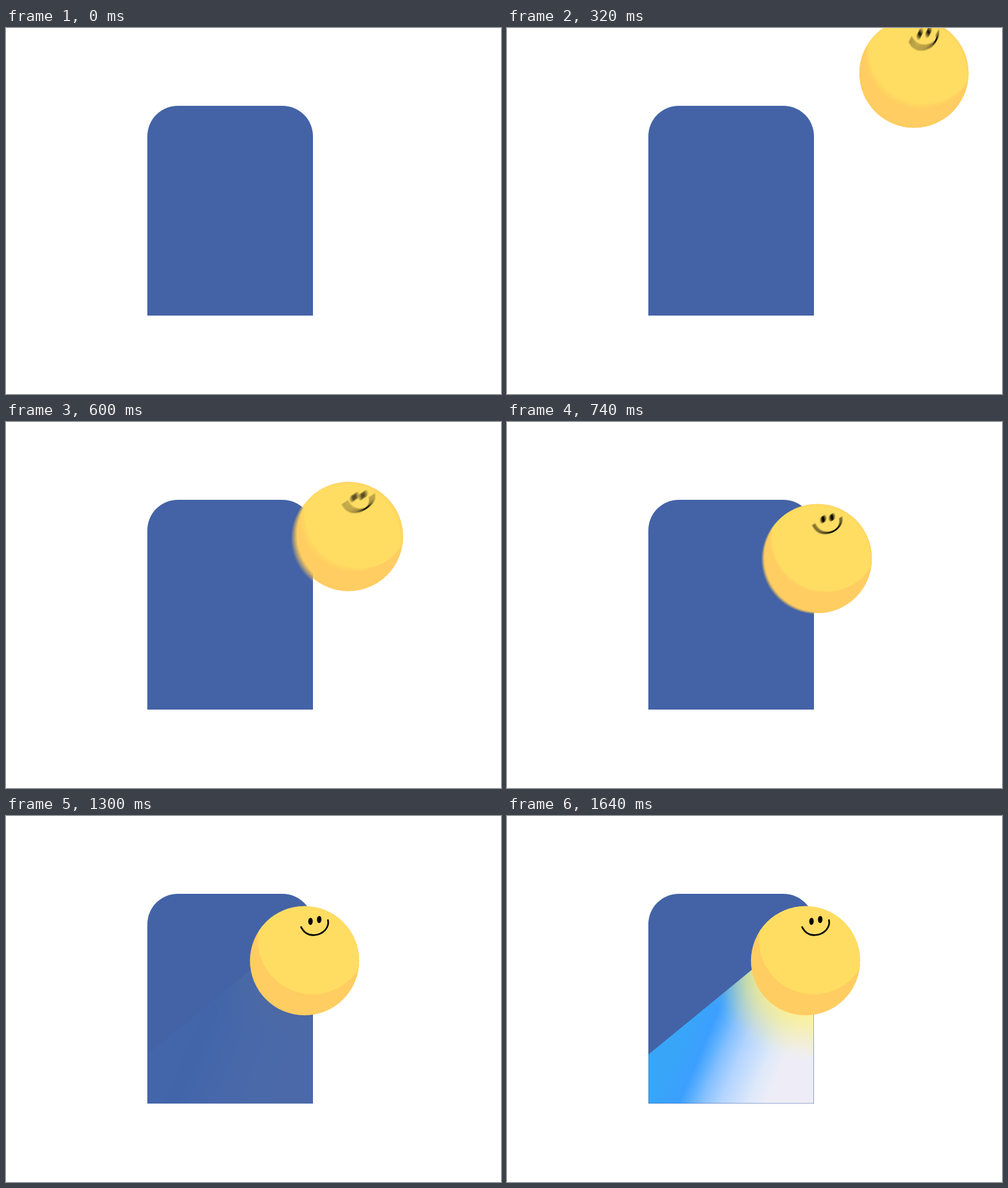
These frames come from a looping animation (795 px wide and 588 px high, 2.74 s). An HTML page with a canvas:

```html
<!DOCTYPE html>
<html lang="en">
<head>
<meta charset="utf-8">
<title>Sunrise</title>
<style>
html, body { margin: 0; width: 100%; height: 100%; overflow: hidden; background: #fff; }
canvas { display: block; }
</style>
</head>
<body>
<canvas id="stage" width="795" height="588"></canvas>
<script>
const W = 795, H = 588, LOOP = 2740, STEP = 20, SHUTTER = 20, SAMPLES = 10, R = 87.7;
const stage = document.getElementById('stage').getContext('2d');

function layer() {
  const canvas = document.createElement('canvas');
  canvas.width = W;
  canvas.height = H;
  return canvas.getContext('2d');
}

const disc = (x, y, r = R) => {
  const path = new Path2D();
  path.arc(x, y, r, 0, 2 * Math.PI);
  return path;
};

const panel = new Path2D();
panel.roundRect(227, 125, 266, 337, [49, 49, 0, 0]);

// Sun path: time, position and velocity in px/ms
const keys = [
  { t: 0, x: 685.5, y: -107, vx: 0, vy: 0.62 },
  { t: 40, x: 685.5, y: -82, vx: 0, vy: 0.62 },
  { t: 200, x: 676.5, y: 11, vx: -0.13, vy: 0.53 },
  { t: 440, x: 617.5, y: 126.5, vx: -0.35, vy: 0.4 },
  { t: 560, x: 571, y: 169.5, vx: -0.46, vy: 0.35 },
  { t: 600, x: 550, y: 184, vx: -0.5, vy: 0.34 },
  { t: 900, x: 479.5, y: 232.5, vx: 0, vy: 0 }
];

function hermite(a, b, u, axis) {
  const span = b.t - a.t, v = 'v' + axis, u2 = u * u, u3 = u2 * u;
  return a[axis] * (2 * u3 - 3 * u2 + 1) + b[axis] * (3 * u2 - 2 * u3)
    + span * (a[v] * (u3 - 2 * u2 + u) + b[v] * (u3 - u2));
}

function sunAt(time) {
  const t = Math.min(Math.max(time, 0), 900);
  const i = Math.max(1, keys.findIndex(k => k.t >= t));
  const a = keys[i - 1], b = keys[i], u = (t - a.t) / (b.t - a.t);
  return { x: hermite(a, b, u, 'x'), y: hermite(a, b, u, 'y') };
}

function drawSun(c, { x, y }) {
  c.save();
  c.translate(x, y);
  c.fillStyle = '#ffcd61';
  c.fill(disc(0, 0));
  c.save();
  c.clip(disc(0, 0));
  c.fillStyle = '#ffdd62';
  c.fill(disc(12.7, -33.7));
  c.restore();

  c.fillStyle = c.strokeStyle = '#000';
  for (const [ex, ey] of [[9.5, -63.2], [23.5, -66.2]]) {
    c.beginPath();
    c.ellipse(ex, ey, 3.6, 5.8, 0.05, 0, 2 * Math.PI);
    c.fill();
  }
  c.lineWidth = 2.6;
  c.lineCap = 'round';
  c.beginPath();
  c.moveTo(-5.6, -54.2);
  c.bezierCurveTo(-1, -45, 7, -40.5, 16, -41.2);
  c.bezierCurveTo(30, -42.5, 40, -53, 37.6, -65.2);
  c.stroke();
  c.restore();
}

function makeBeam() {
  const c = layer();
  const edge = new Path2D('M227.3 383 L480 176 L492.4 232 V461.4 H227.3 Z');
  const sky = c.createLinearGradient(365, 159, 519, 225);
  [[0, '#38a5f8'], [0.22, '#3c9fff'], [0.32, '#5cb0ff'], [0.42, '#85c0ff'],
   [0.58, '#b2d4ff'], [0.84, '#dee9f9'], [1, '#eeedf7']].forEach(s => sky.addColorStop(...s));
  const glow = c.createRadialGradient(479.5, 232.5, R, 479.5, 232.5, 162);
  [[0, 0.72], [0.2, 0.58], [0.5, 0.32], [0.8, 0.08], [1, 0]]
    .forEach(([at, alpha]) => glow.addColorStop(at, `rgba(255,241,120,${alpha})`));
  for (const paint of [sky, glow]) {
    c.fillStyle = paint;
    c.fill(edge);
  }
  return c.canvas;
}

const beam = makeBeam();
const scene = layer();

function drawScene(t, sun, sample) {
  const c = scene;
  c.fillStyle = '#fff';
  c.fillRect(0, 0, W, H);
  // The rim stays crisp on white and blurs only over the panel
  c.fillStyle = '#ffcd61';
  c.fill(disc(sun.x, sun.y));
  c.fillStyle = '#4363a6';
  c.fill(panel);
  c.globalAlpha = Math.min(Math.max((t - 1285) / 355, 0), 1);
  c.drawImage(beam, 0, 0);
  c.globalAlpha = 1;
  c.save();
  const visible = new Path2D(panel);
  visible.addPath(disc(sun.x, sun.y));
  c.clip(visible);
  drawSun(c, sample);
  c.restore();
}

function render(t) {
  const sun = sunAt(t);
  const count = t < 900 ? SAMPLES : 1;
  for (let i = 0; i < count; i++) {
    const offset = ((i + 0.5) / count - 0.5) * SHUTTER;
    drawScene(t, sun, sunAt(t + offset));
    stage.globalAlpha = 1 / (i + 1);
    stage.drawImage(scene.canvas, 0, 0);
  }
}

const start = performance.now();
function tick() {
  const t = (performance.now() - start) % LOOP;
  render(Math.floor(t / STEP) * STEP);
  requestAnimationFrame(tick);
}
tick();
</script>
</body>
</html>
```
